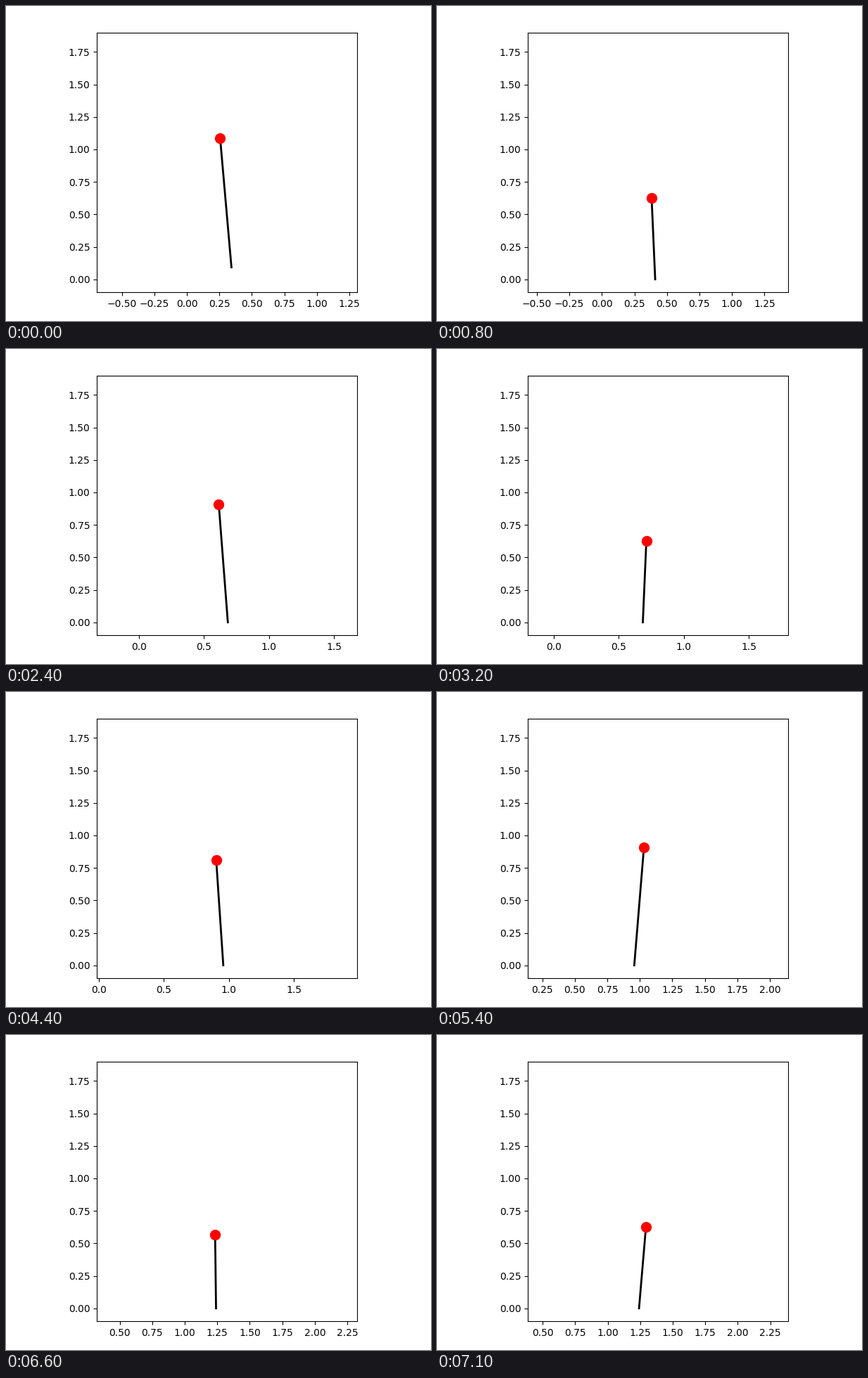
These frames come from a looping animation (604x448 px, 7300 ms). A matplotlib script:

```python
import numpy as np
import matplotlib.pyplot as plt
from matplotlib.animation import FuncAnimation

W, H, DPI = 604, 448, 100
TICKS = 73          # 100 ms each

# Spring-leg hopper; the time unit is a tenth of a second
G, K = 0.0981, 0.5
APEX = 1.1
TILT = np.radians(5)
REACH, STAND = np.sin(TILT), np.cos(TILT)
FOOT = np.array([0.41, 0.6845, 0.9575, 1.2405])
EXIT = np.array([0.0892, 0.0855, 0.0927, 0.127])   # body ahead of foot at lift-off

OMEGA = np.sqrt(K)
REST = 1 - G / K
V_LAND = np.sqrt(2 * G * (APEX - STAND))
SWING = np.hypot(STAND - REST, V_LAND / OMEGA)
STANCE = np.arccos((REST - STAND) / SWING) / OMEGA   # half durations
FLIGHT = V_LAND / G
PERIOD = 2 * (STANCE + FLIGHT)
LOW = 5.24 + PERIOD * np.arange(len(FOOT))           # times of deepest compression

LAND_X, LIFT_X = FOOT - REACH, FOOT + EXIT
SPEED = np.r_[0.0347, (LAND_X[1:] - LIFT_X[:-1]) / (2 * FLIGHT), 0.041]


def hermite(h, span, x0, x1, v0, v1):
    a, b = v0 * span, v1 * span
    return (x0 * (1 + 2 * h) * (1 - h) ** 2 + a * h * (1 - h) ** 2
            + x1 * h * h * (3 - 2 * h) - b * h * h * (1 - h))


def pose(t):
    """Body and foot positions at time t."""
    j = int(np.argmin(np.abs(LOW - t)))
    d = t - LOW[j]
    if abs(d) <= STANCE:
        x = hermite((d + STANCE) / (2 * STANCE), 2 * STANCE,
                    LAND_X[j], LIFT_X[j], SPEED[j], SPEED[j + 1])
        return x, REST - SWING * np.cos(OMEGA * d), FOOT[j], 0.0
    if d < 0:
        x = LAND_X[j] + SPEED[j] * (d + STANCE)
    else:
        x = LIFT_X[j] + SPEED[j + 1] * (d - STANCE)
    y = APEX - G / 2 * (PERIOD / 2 - abs(d)) ** 2
    return x, y, x + REACH, y - STAND


# Three steps are skipped and a few begin late
STEPS = [n for n in range(36) if n not in (3, 25, 30)]
STARTS = [2 * n + (n in (2, 34, 35)) for n in STEPS]

fig = plt.figure(figsize=(W / DPI, H / DPI), dpi=DPI, facecolor="white")
ax = fig.add_axes([129.2 / W, 40.8 / H, 369.6 / W, 369.6 / H])
ax.set_ylim(-0.1, 1.9)
ax.set_yticks(np.arange(8) * 0.25)
leg, = ax.plot([], [], "k-", lw=2)
body, = ax.plot([], [], "ro", ms=10)


def draw(tick):
    n = STEPS[np.searchsorted(STARTS, tick, side="right") - 1]
    x, y, fx, fy = pose(n)
    leg.set_data([x, fx], [y, fy])
    body.set_data([x], [y])

    left = 0.0308 * (n + 10) - 1
    step, digits = (0.5, 1) if 11 <= n <= 24 else (0.25, 2)
    first, last = int(np.ceil(left / step)), int(np.floor((left + 2) / step))
    marks = [i * step for i in range(first, last + 1)]
    ax.set_xticks(marks, [f"{m:.{digits}f}".replace("-", "\u2212") for m in marks])
    ax.set_xlim(left, left + 2)
    return leg, body


anim = FuncAnimation(fig, draw, frames=TICKS, interval=100,
                     repeat=True, repeat_delay=0, blit=False)
plt.show()
```
